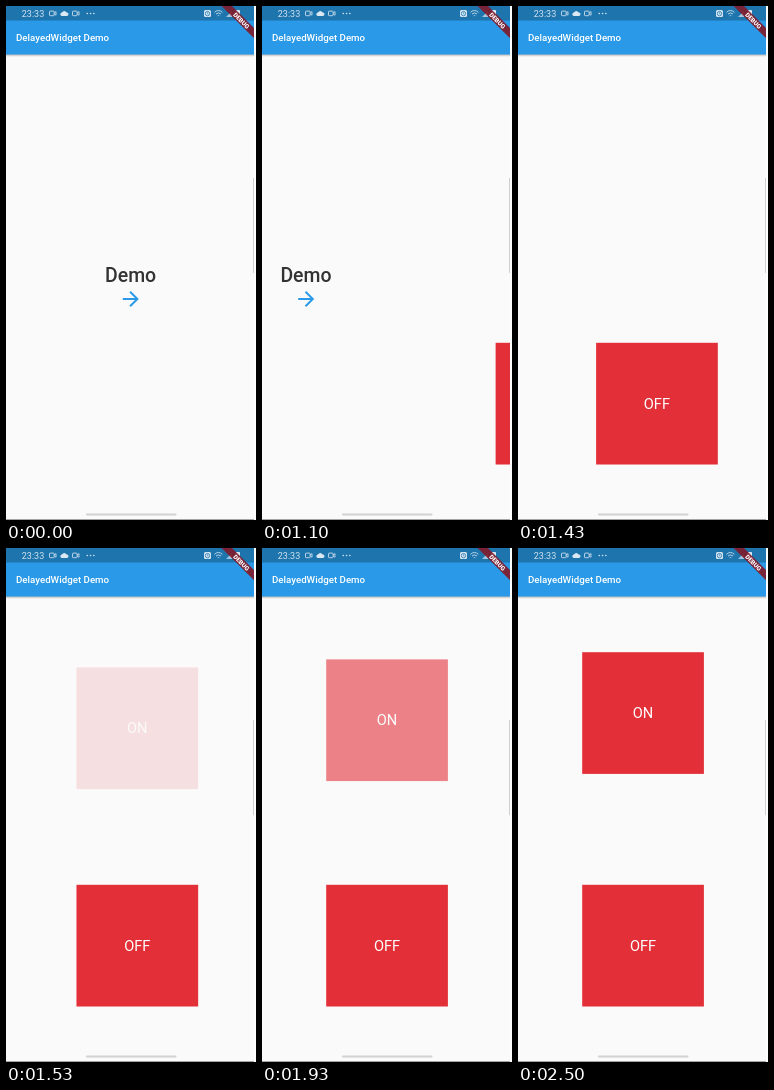
Animation of 250x514 px, one loop 3.11 s. Source, as an HTML page:

```html
<!DOCTYPE html>
<html lang="en">
<head>
<meta charset="utf-8">
<title>DelayedWidget Demo</title>
<style>
  html, body { margin: 0; width: 100%; height: 100%; overflow: hidden; background: #fff; }
  svg { display: block; width: 250px; height: 514px; font-family: Roboto, sans-serif; }
  .label { font-size: 14.6px; fill: #fff; text-anchor: middle; }
</style>
</head>
<body>
<svg viewBox="0 0 250 514">
  <defs>
    <linearGradient id="shade" x2="0" y2="1">
      <stop stop-color="#000" stop-opacity=".3"/>
      <stop offset="1" stop-color="#000" stop-opacity="0"/>
    </linearGradient>
    <g id="camera" fill="none" stroke="#c9deec" stroke-width=".9">
      <rect x=".5" y=".5" width="4.6" height="4.6" rx=".8"/>
      <path d="M5.1 2.3L7 1v3.600L5.100 3.300"/>
    </g>
    <g id="box">
      <rect x="64.200" width="121.700" height="121.700" fill="#e33038"/>
      <text class="label" x="125" y="66"></text>
    </g>
  </defs>

  <rect width="250" height="514" fill="#fafafa"/>

  <g id="intro">
    <text x="124.600" y="276" text-anchor="middle" font-size="19.470" font-weight="500" fill="#333">Demo</text>
    <path transform="translate(112.800 281)" fill="#2a9ae8"
      d="M12 4l-1.410 1.410L16.170 11H4v2h12.170l-5.580 5.590L12 20l8-8z"/>
  </g>
  <g id="boxes">
    <g id="on">
      <rect x="64.200" width="121.700" height="121.700" fill="#e33038"/>
      <text class="label" x="125" y="66">ON</text>
    </g>
    <g transform="translate(0 336.800)">
      <rect x="64.200" width="121.700" height="121.700" fill="#e33038"/>
      <text class="label" x="125" y="66">OFF</text>
    </g>
  </g>

  <!-- bars -->
  <rect y="48" width="250" height="3" fill="url(#shade)"/>
  <rect width="250" height="48.500" fill="#2a9ae8"/>
  <rect width="250" height="14.500" fill="#1e74ad"/>
  <text x="10" y="35" font-size="9.730" font-weight="500" fill="#fff">DelayedWidget Demo</text>

  <!-- status icons -->
  <text x="15.800" y="10.800" font-size="9" fill="#d3e4ef">23:33</text>
  <use href="#camera" x="43" y="4.600"/>
  <use href="#camera" x="66" y="4.600"/>
  <g fill="#d9e8f2">
    <path d="M56 10a1.700 1.700 0 0 1 0-3.400a2.500 2.500 0 0 1 4.600 0a1.700 1.700 0 0 1 .4 3.400z"/>
    <circle cx="81.300" cy="7.500" r=".8"/><circle cx="84.600" cy="7.500" r=".8"/><circle cx="87.900" cy="7.500" r=".8"/>
    <rect x="198" y="4" width="7" height="7" rx="1.500"/>
    <path d="M220 11l6-6v6z" opacity=".7"/>
    <rect x="229.500" y="4" width="4.500" height="7" rx=".8"/>
  </g>
  <circle cx="201.500" cy="7.600" r="2.200" fill="none" stroke="#1e74ad" stroke-width=".8"/>
  <path d="M201.500 6.300v1.500h1" fill="none" stroke="#1e74ad" stroke-width=".6"/>
  <path d="M208.500 6.300q4-3.600 8 0M210 8q2.500-2.200 5 0M211.700 9.800q.8-.7 1.600 0" fill="none" stroke="#c9deec" stroke-width=".9"/>

  <!-- corner banner -->
  <g transform="translate(250 0) rotate(45)">
    <rect x="-26" y="17" width="52" height="7.300" fill="#7f1c2c" fill-opacity=".92"/>
    <text y="22.900" text-anchor="middle" font-size="6.200" font-weight="900" fill="#fff">DEBUG</text>
  </g>

  <!-- screen edges -->
  <rect x="80" y="507.600" width="90.500" height="1.800" rx=".9" fill="#d2d2d2"/>
  <rect x="247" y="172" width="1" height="95" fill="#cfcfcf"/>
  <rect y="513" width="248" height="1" fill="#a4a4a4"/>
  <rect x="248" width="2" height="514" fill="#fff"/>
</svg>
<script>
  const LOOP = 3110, WIDTH = 250;
  const [intro, boxes, on] = ['intro', 'boxes', 'on'].map(id => document.getElementById(id));
  const move = (el, x, y) => el.setAttribute('transform', `translate(${x} ${y})`);

  // Distance the second page still has to travel: a swipe, then a settling spring.
  function pageLeft(t) {
    if (t < 900) return WIDTH;
    if (t < 1160) return WIDTH - 0.00165 * (t - 880) ** 2;
    return t < 1930 ? 69 * Math.exp(-0.00797 * (t - 1230)) : 0;
  }

  function draw(now) {
    const t = now % LOOP;
    const left = pageLeft(t);
    const p = Math.min(1, Math.max(0, (t - 1430) / 1070));
    const rest = (1 - p) ** 1.41;
    move(intro, left - WIDTH, 0);
    move(boxes, left, 0);
    move(on, 0, 104.2 + 17.5 * rest);
    on.setAttribute('opacity', 1 - rest);
  }

  const start = performance.now();
  function tick() {
    draw(performance.now() - start);
    requestAnimationFrame(tick);
  }
  tick();
</script>
</body>
</html>
```
